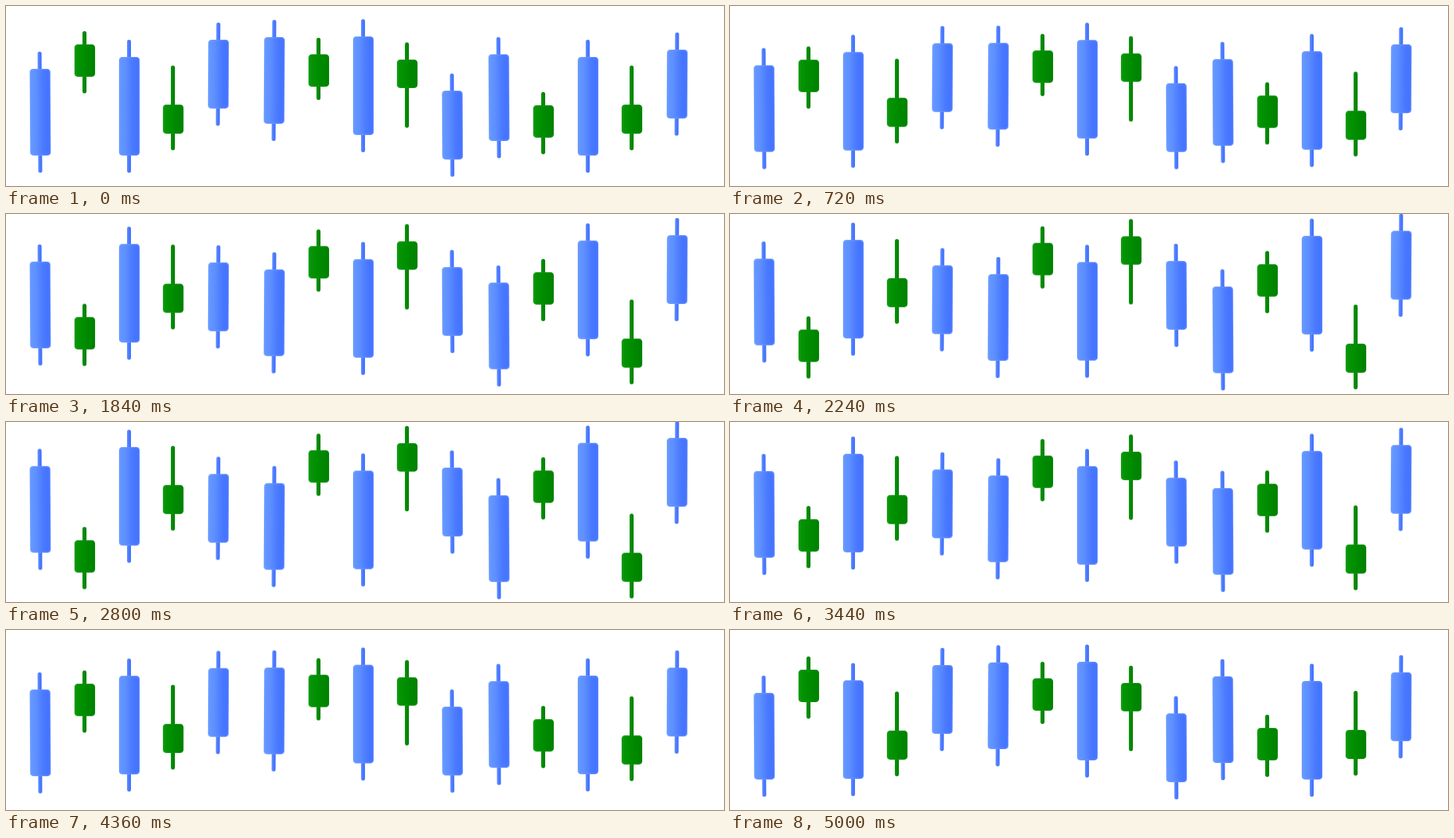
Animation, 1080 px wide and 272 px high, one loop 5.04 s. Source, as an HTML page:

```html
<!DOCTYPE html>
<html>
<head>
<meta charset="utf-8">
<title>Candlesticks</title>
<style>
html, body { margin: 0; width: 100%; height: 100%; overflow: hidden; background: #fff; }
.candle { position: absolute; top: 0; width: 30.5px; will-change: transform; }
.wick, .body { position: absolute; box-sizing: border-box; }
.wick { left: 12.1px; width: 6.2px; height: 100%; border-radius: 3px; }
.body { width: 100%; border-radius: 5px; }
.blue .wick { background: linear-gradient(90deg, #6a96ff, #4a7aff 45%, #4271fb); }
.blue .body {
  background: linear-gradient(90deg, #6699ff, #5e90ff 30%, #4a7aff 65%, #4270ff);
  box-shadow: inset 0 0 3px 0.5px #86acffb0;
}
.green .wick { background: linear-gradient(90deg, #0d940d, #008a00 50%, #007c00); }
.green .body {
  background: linear-gradient(90deg, #0a960a, #009000 35%, #008800 65%, #008200);
  box-shadow: inset 1px 0 3px 0 #3cae3ca0;
}
</style>
</head>
<body>
<script>
const LOOP = 5040, TURN = 2600, END = 5000;

// colour, upper wick, body and lower wick heights
const kinds = {
  long: ['blue', 26, 131, 26],
  tall: ['blue', 26, 149, 26],
  mid: ['blue', 26, 104, 26],
  small: ['green', 20, 49, 25],
  smallUp: ['green', 25, 49, 20],
  tailTop: ['green', 59, 43.5, 25.5],
  tailLow: ['green', 25.5, 43.5, 60]
};

// kind, left, top at start, turn and end, sideways lean
const candles = [
  ['long', 36.2, 69, 40, 69, 1],
  ['small', 103.2, 38, 161, 40, 0],
  ['tall', 169.7, 51, 11, 50, 0],
  ['tailTop', 235.8, 90, 35, 93, 0],
  ['mid', 303.6, 25, 53, 27, -0.8],
  ['long', 388.2, 21, 67.3, 23, -1],
  ['smallUp', 455.2, 48, 17, 48, 0],
  ['tall', 521.6, 20, 48, 22, 0],
  ['tailLow', 587.8, 55, 5, 54, 0],
  ['mid', 655.6, 102, 41.8, 100, 0.8],
  ['long', 726.2, 47, 85.6, 44, 1],
  ['small', 793.2, 130, 51.8, 128, 0],
  ['tall', 859.7, 51, 4.6, 51, 0],
  ['tailTop', 925.8, 90, 139.5, 92, 0],
  ['mid', 993.6, 40, -2.8, 38, -0.8]
];

function add(parent, name) {
  const el = parent.appendChild(document.createElement('div'));
  el.className = name;
  return el;
}

const moving = candles.map(([kind, left, start, turn, end, lean]) => {
  const [colour, upper, height, lower] = kinds[kind];
  const total = upper + height + lower;
  const el = add(document.body, 'candle ' + colour);
  el.style.left = left + 'px';
  el.style.height = total + 'px';
  add(el, 'wick');
  const body = add(el, 'body');
  body.style.top = upper + 'px';
  body.style.height = height + 'px';
  return { el, start, turn, end, skew: Math.atan(lean / total) };
});

const ease = u => u * u * (3 - 2 * u);
const mix = (a, b, u) => a + (b - a) * ease(Math.min(u, 1));

function draw() {
  const t = performance.now() % LOOP;
  for (const { el, start, turn, end, skew } of moving) {
    const y = t < TURN
      ? mix(start, turn, t / TURN)
      : mix(turn, end, (t - TURN) / (END - TURN));
    el.style.transform = `translateY(${y.toFixed(2)}px) skewX(${skew}rad)`;
  }
  requestAnimationFrame(draw);
}
draw();
</script>
</body>
</html>
```
